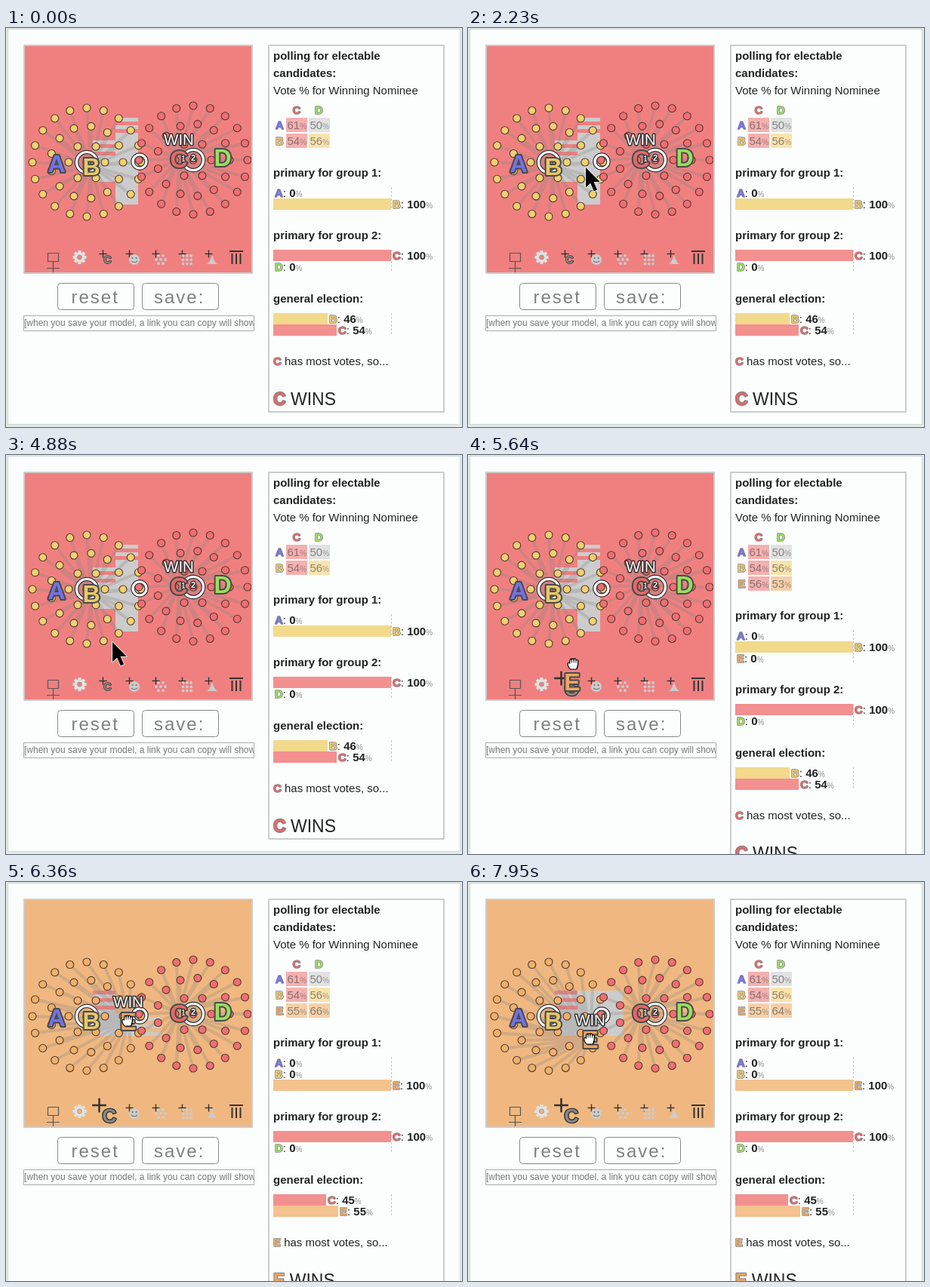
Write an HTML page with a canvas that moves like this. It is 604 px wide and 529 px high and loops after 8000 ms.

```html
<!DOCTYPE html>
<html lang="en">
<head>
<meta charset="utf-8">
<title>Election model</title>
<style>
html, body { margin: 0; width: 100%; height: 100%; overflow: hidden; background: #e1ece9; }
canvas { display: block; }
</style>
</head>
<body>
<canvas id="stage" width="604" height="529"></canvas>
<script>
const g = document.getElementById('stage').getContext('2d');
const LOOP = 8000, STEP = 120, TAU = Math.PI * 2;
const SHOW = 360, HOVER = 5160, GRAB = 5520;
const SANS = '"Liberation Sans", Arial, sans-serif';
const RED = '#f08080', ORANGE = '#f0b880', GRAY = '#cccccc', DARK = '#333';
const COLOR = { A: '#7373e6', B: '#e8c869', C: '#e26a6a', D: '#98e05f', E: '#e9a864' };
const DOT = { B: '#f0d070', C: '#f06e72', E: '#f0b06c' };
const BAR = { B: '#f2d98c', C: '#f39090', E: '#f3c28f' };
const CELL = { B: '#f9e4ae', C: '#f5b0b0', E: '#f5d0a8', '-': '#e2e2e2' };
const SPOT = { A: [67, 179], B: [113, 183], C: [229, 173], D: [287, 171] };

// Key points of the pointer: time, x, y
const ARROW = [[SHOW, 80, 508], [480, 68, 469], [960, 167, 289], [1080, 150, 283], [1800, 147, 208],
  [2160, 156, 185], [2400, 158, 150], [2760, 101, 190], [3360, 161, 213], [3600, 167, 160],
  [4320, 144, 190], [4800, 141, 248], [HOVER, 134, 288]];
const HAND = [[GRAB, 137, 300], [5880, 144, 231], [6000, 155, 200], [6240, 161, 184], [6360, 161, 184],
  [6600, 163, 166], [7560, 163, 200], [7800, 161, 208]];

function along(path, t) {
  const i = path.findIndex(p => p[0] > t);
  if (i < 0) return path[path.length - 1].slice(1);
  if (i === 0) return path[0].slice(1);
  const [a, b] = [path[i - 1], path[i]], k = (t - a[0]) / (b[0] - a[0]);
  return [a[1] + (b[1] - a[1]) * k, a[2] + (b[2] - a[2]) * k];
}

// Voters stand on three rings, about 22 px apart
function crowd(cx, cy) {
  const out = [[cx, cy]];
  for (let r = 24; r <= 72; r += 24) {
    const n = Math.floor(TAU * r / 22);
    for (let i = 0; i < n; i++) out.push([cx + r * Math.cos(i / n * TAU), cy + r * Math.sin(i / n * TAU)]);
  }
  return out;
}
const GROUP1 = crowd(107, 178), GROUP2 = crowd(248, 175);

// Poll results follow from where E stands
function poll(added, [x, y]) {
  const share = Math.round(2 * (55 + 0.44 * (x - 162))) / 2;
  const pick = added && share > 46 ? 'E' : 'B';
  return {
    pick, winner: pick === 'E' && share > 50 ? 'E' : 'C',
    vsC: share > 50 ? [Math.round(share), 'E'] : [Math.round(100 - share), 'C'],
    vsD: [Math.round(66 + 0.12 * (x - 162) - (y - 184) / 12), 'E'],
    general: pick === 'E' ? [['C', Math.round(100 - share)], ['E', Math.round(share)]] : [['B', 46], ['C', 54]]
  };
}

function rect(x, y, w, h, c) { g.fillStyle = c; g.fillRect(x, y, w, h); }

function line(pts, c, w) {
  g.strokeStyle = c; g.lineWidth = w;
  g.beginPath(); pts.forEach(p => g.lineTo(...p)); g.stroke();
}

function disc(x, y, r, fill, stroke, w = 1) {
  g.beginPath(); g.arc(x, y, r, 0, TAU);
  if (fill) { g.fillStyle = fill; g.fill(); }
  if (stroke) { g.strokeStyle = stroke; g.lineWidth = w; g.stroke(); }
}

// Draws text and returns the x where it ends
function text(s, x, y, size = 15, c = '#222', weight = '') {
  g.font = `${weight} ${size}px ${SANS}`; g.fillStyle = c; g.textAlign = 'left';
  g.fillText(s, x, y);
  return x + g.measureText(s).width;
}

function outlined(s, x, y, size, c, edge, w, weight = 'bold', align = 'center') {
  g.font = `${weight} ${size}px ${SANS}`; g.textAlign = align;
  g.strokeStyle = edge; g.lineWidth = w; g.strokeText(s, x, y);
  g.fillStyle = c; g.fillText(s, x, y);
  return x + g.measureText(s).width;
}

const mark = (id, x, y, size = 15, align = 'left') =>
  outlined(id, x, y, size, COLOR[id], 'rgba(60,50,50,.6)', size / 10, 'bold', align);

const plus = (x, y, r, w) => {
  line([[x - r, y], [x + r, y]], DARK, w); line([[x, y - r], [x, y + r]], DARK, w);
};

function drawMap(won, e) {
  rect(25, 24, 300, 300, won ? ORANGE : RED);
  const cells = [[3, 4, RED], [3, 5], [4, 5]];
  if (!won) cells.push([4, 3, RED], [4, 4], [4, 6]);
  else if (e[1] > 196) cells.push([4, 4], [5, 4], [5, 5]);
  else cells.push([5, 5, ORANGE]);
  cells.forEach(([col, row, stripe]) => {
    const x = 25 + col * 30, y = 24 + row * 30;
    rect(x, y, 30, 30, stripe || GRAY);
    if (stripe) for (let k = 5; k < 30; k += 10) rect(x, y + k, 30, 5, GRAY);
  });
}

function drawVoters(pts, pick, target) {
  g.beginPath();
  pts.forEach(p => { g.moveTo(...p); g.lineTo(...target); });
  g.strokeStyle = 'rgba(128,128,128,.27)'; g.lineWidth = 4; g.stroke();
  pts.forEach(p => disc(...p, 5, DOT[pick], '#50392f', 1.1));
}

function ring(x, y, r) {
  disc(x, y, r, null, DARK, 5.5);
  disc(x, y, r, null, '#fff', 3.2);
}

function drawTools(hover) {
  g.strokeStyle = '#555'; g.lineWidth = 1.2; g.strokeRect(55.5, 298.5, 14, 11);
  line([[62.5, 310], [62.5, 324]], '#555', 1.2);
  line([[54, 318.5], [71, 318.5]], '#555', 1);

  g.save(); g.translate(97.5, 304);
  for (let i = 0; i < 8; i++) { g.rotate(TAU / 8); rect(-2, -9, 4, 6, '#e2e2e2'); }
  g.restore();
  disc(97.5, 304, 5, null, '#e2e2e2', 4);
  disc(97.5, 304, 3, null, '#999', 1);

  const k = hover ? 1.8 : 1;
  plus(hover ? 123.5 : 128.5, hover ? 296 : 299.5, 5.2 * k, 1.4 * k);
  outlined('C', hover ? 137 : 134.5, hover ? 319 : 312, 14.5 * k, '#888', DARK, 1.5 * k);
  for (let x = 163.5; x < 270; x += 35) plus(x, 299.5, 5, 1.4);

  disc(170, 307, 7, '#ccc');
  disc(167.5, 305, 1, '#666'); disc(172.5, 305, 1, '#666');
  line([[166, 309], [168, 310.5], [172, 310.5], [174, 309]], '#777', 1.1);
  disc(205, 307, 1.9, '#ccc');
  for (let a = 0; a < 6; a++) disc(205 + 6 * Math.cos(a * TAU / 6), 307 + 6 * Math.sin(a * TAU / 6), 1.9, '#ccc');
  for (let i = 0; i < 9; i++) disc(234.5 + i % 3 * 5.3, 302 + Math.floor(i / 3) * 5.3, 1.9, '#ccc');
  g.fillStyle = '#ccc'; g.beginPath(); g.moveTo(266, 313);
  g.quadraticCurveTo(270, 311, 273, 301); g.quadraticCurveTo(276, 311, 280, 313); g.fill();

  line([[296, 296], [314, 296]], DARK, 2);
  for (let x = 299.5; x < 312; x += 5.5) line([[x, 299], [x, 313]], DARK, 2);
}

function drawArena(t, { pick, winner }, e) {
  g.save();
  g.beginPath(); g.rect(25, 24, 300, 300); g.clip();
  const at = t < GRAB ? SPOT : { ...SPOT, E: e };
  drawMap(winner === 'E', e);
  drawVoters(GROUP1, pick, at[pick]);
  drawVoters(GROUP2, 'C', at.C);
  drawTools(t >= HOVER);
  ring(107, 178, 13.5); ring(248, 175, 13.5); ring(177, 177, 9);
  outlined('2', 248, 176, 11, '#fff', '#222', 2.5);
  for (const id in at) outlined(id, at[id][0], at[id][1] + 11.5, 32, COLOR[id], '#4a4a4a', 4);
  outlined('1', 235, 177, 10, '#ddd', '#222', 2);
  outlined('WIN', at[winner][0], at[winner][1] - 18, 20.5, '#fff', DARK, 3, '');
  g.restore();
  g.strokeStyle = GRAY; g.lineWidth = 2; g.strokeRect(24, 23, 302, 302);
}

function button(x, label, tx) {
  g.strokeStyle = '#888'; g.lineWidth = 1;
  g.beginPath(); g.roundRect(x, 338.5, 101, 35, 4); g.stroke();
  g.letterSpacing = '2px'; text(label, tx, 365, 24, '#808080'); g.letterSpacing = '0px';
}

function drawControls() {
  button(68.5, 'reset', 86.5);
  button(180.5, 'save:', 196);
  g.strokeStyle = '#aaa'; g.strokeRect(23.5, 381.5, 305, 20);
  g.save(); g.beginPath(); g.rect(24, 382, 304, 19); g.clip();
  text('[when you save your model, a link you can copy will show', 24, 395, 12, '#777');
  g.restore();
}

function drawTable(rows) {
  mark('C', 385, 114, 15, 'center'); mark('D', 414.5, 114, 15, 'center');
  rows.forEach(([id, ...cells], i) => {
    const y = 119 + i * 21;
    mark(id, 362.5, y + 15, 15, 'center');
    cells.forEach(([pct, who], k) => {
      const x = 371 + k * 30;
      rect(x, y, 28, 19, CELL[who]);
      const end = text(pct, x + 1.5, y + 14.5, 15, 'rgba(70,70,70,.6)');
      text('%', end, y + 14.5, 10, 'rgba(70,70,70,.5)');
    });
  });
}

function drawChart(title, y, rows) {
  const top = Math.floor(y) + 19;
  text(title, 354, top - 14, 15, '#222', 'bold');
  g.setLineDash([3, 2]);
  line([[510.5, top], [510.5, top + rows.length * 15]], '#c4c4c4', 1);
  g.setLineDash([]);
  rows.forEach(([id, pct], i) => {
    const ry = top + i * 15, w = Math.round(pct * 1.56), base = ry + 13;
    rect(354, ry, w, 15, BAR[id]);
    let x = mark(id, 356 + w, base);
    x = text(': ', x, base);
    x = text(pct, x, base, 15, '#222', 'bold');
    text('%', x, base, 10, '#888');
  });
}

function drawPanel(added, { pick, winner, vsC, vsD, general }) {
  g.strokeStyle = GRAY; g.lineWidth = 2; g.strokeRect(348, 23, 232, added ? 523 : 486);
  text('polling for electable', 354, 42, 15, '#222', 'bold');
  text('candidates:', 354, 65, 15, '#222', 'bold');
  text('Vote % for Winning Nominee', 354, 88);

  const rows = [['A', [61, 'C'], [50, '-']], ['B', [54, 'C'], [56, 'B']]];
  if (added) rows.push(['E', vsC, vsD]);
  drawTable(rows);

  const y1 = 150 + rows.length * 21, y2 = y1 + 53.5 + rows.length * 15, y3 = y2 + 83.5;
  drawChart('primary for group 1:', y1, rows.map(([id]) => [id, id === pick ? 100 : 0]));
  drawChart('primary for group 2:', y2, [['C', 100], ['D', 0]]);
  drawChart('general election:', y3, general);
  text(' has most votes, so...', mark(winner, 354, y3 + 88), y3 + 88);
  text(' WINS', mark(winner, 354, y3 + 141, 23), y3 + 141, 23);
}

function drawArrow(x, y) {
  g.save(); g.translate(x, y);
  g.beginPath();
  [[0, 0], [0, 26.5], [6.2, 20.8], [10.8, 31.5], [15.2, 29.5], [10.6, 19], [18.8, 19]].forEach(p => g.lineTo(...p));
  g.closePath();
  g.strokeStyle = '#fff'; g.lineWidth = 1.6; g.stroke();
  g.fillStyle = '#000'; g.fill();
  g.restore();
}

function drawHand(x, y) {
  g.save(); g.translate(x, y);
  g.beginPath(); g.moveTo(-4, 7);
  g.quadraticCurveTo(-8, 2, -7, -1); g.quadraticCurveTo(-6, -2.5, -4.5, -1);
  for (let i = 0; i < 4; i++) {
    const px = -4.7 + i * 2.8, top = i === 3 ? -5.5 : -8;
    g.bezierCurveTo(px, top, px + 2.8, top, px + 2.8, -4.5);
  }
  g.quadraticCurveTo(7, 2, 4.5, 7); g.closePath();
  g.fillStyle = '#fff'; g.fill();
  g.strokeStyle = '#000'; g.lineWidth = 1.2; g.stroke();
  for (let k = -1.9; k < 4; k += 2.8) line([[k, -4.5], [k, -1.5]], '#000', 0.9);
  g.restore();
}

function draw(now) {
  const t = Math.floor(now % LOOP / STEP) * STEP;
  const added = t >= GRAB;
  // The dragged letter trails the hand by one step
  const [hx, hy] = along(HAND, t - STEP), e = [hx + 1, hy];
  const result = poll(added, e);

  g.lineJoin = 'round';
  rect(0, 0, 604, 529, '#e1ece9');
  rect(2, 1, 600, added ? 540 : 525, '#cbdad6');
  rect(3, 2, 598, added ? 540 : 523, '#fcfefd');
  drawArena(t, result, e);
  drawControls();
  drawPanel(added, result);
  if (added) drawHand(...along(HAND, t));
  else if (t >= SHOW) drawArrow(...along(ARROW, t));
}

const began = performance.now();
function tick() {
  draw(performance.now() - began);
  requestAnimationFrame(tick);
}
tick();
</script>
</body>
</html>
```
